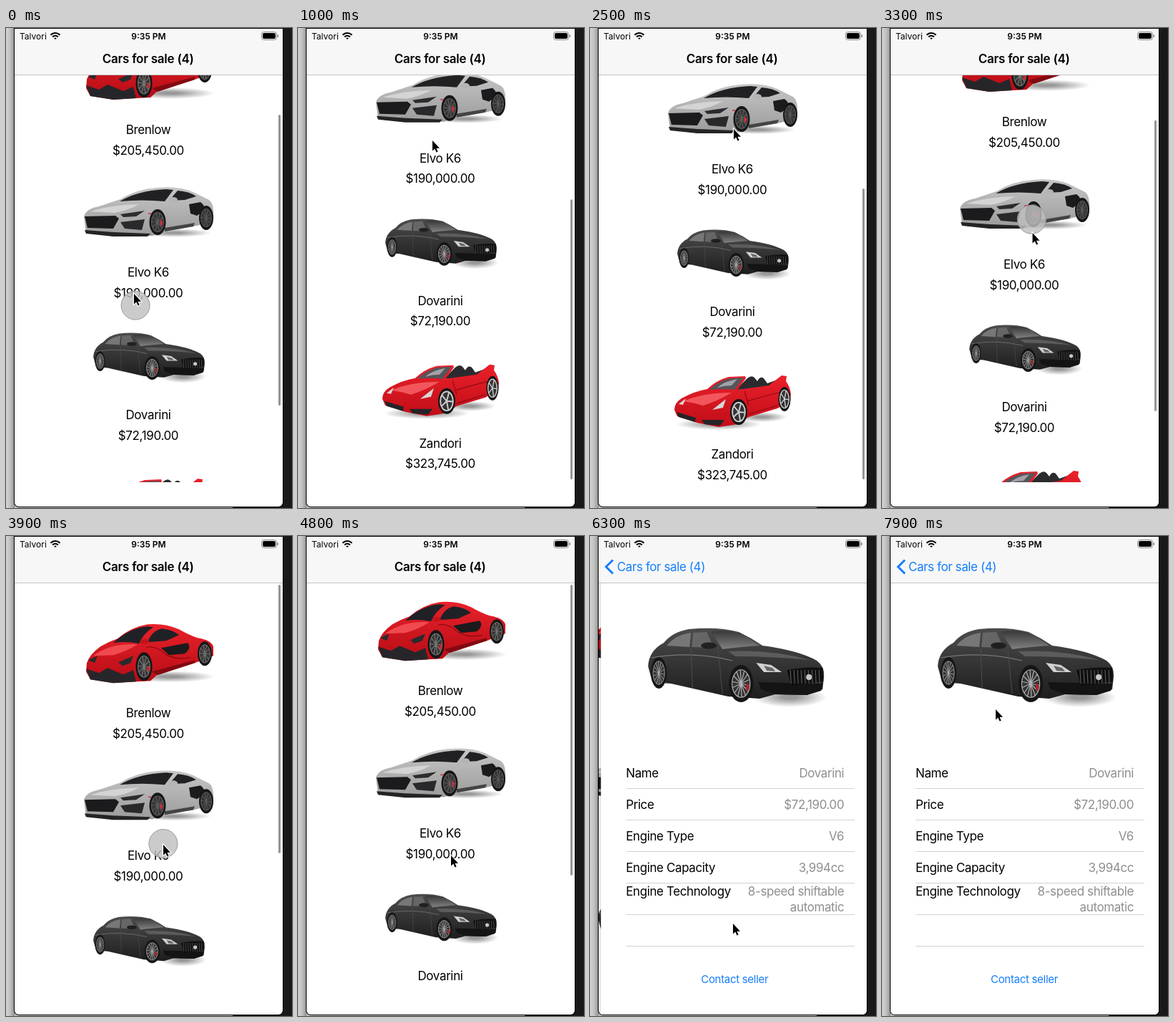
Write an HTML page with a canvas that moves like this. It is 400 px wide and 670 px high and loops after 8 s.

```html
<!DOCTYPE html>
<html lang="en">
<head>
<meta charset="utf-8">
<title>Cars for sale</title>
<style>
html, body { margin: 0; width: 100%; height: 100%; overflow: hidden; background: #fff; }
canvas { display: block; width: 400px; height: 670px; }
</style>
</head>
<body>
<canvas id="stage"></canvas>
<script>
const W = 400, H = 670, LOOP = 8000, STEP = 100;
const MAX_SCROLL = 218, VIEW = 602, ROW = 199;
const BLUE = '#157efb', GRAY = '#8f8f8f', DARK = '#1b1b1d';

const canvas = document.getElementById('stage');
const ratio = window.devicePixelRatio || 1;
canvas.width = W * ratio;
canvas.height = H * ratio;
const ctx = canvas.getContext('2d');

// ---------- helpers ----------
const clamp = (v, a, b) => Math.min(b, Math.max(a, v));
const mix = (a, b, k) => a + (b - a) * k;
const smooth = k => k * k * (3 - 2 * k);
// Remaining distance of a critically damped spring
const spring = (ms, w) => ms <= 0 ? 1 : (1 + w * ms / 1000) * Math.exp(-w * ms / 1000);

function fill(color, d) {
  ctx.fillStyle = color;
  ctx.fill(new Path2D(d));
}

function line(color, width, d) {
  ctx.strokeStyle = color;
  ctx.lineWidth = width;
  ctx.stroke(new Path2D(d));
}

function oval(color, x, y, rx, ry) {
  ctx.fillStyle = color;
  ctx.beginPath();
  ctx.ellipse(x, y, rx, ry, 0, 0, 7);
  ctx.fill();
}

function box(color, x, y, w, h, r = 0) {
  ctx.fillStyle = color;
  ctx.beginPath();
  ctx.roundRect(x, y, w, h, r);
  ctx.fill();
}

function text(str, x, y, { size = 17, weight = 400, color = '#000', align = 'left', track = -0.4 } = {}) {
  ctx.font = `${weight} ${size}px Inter, "Open Sans", sans-serif`;
  ctx.letterSpacing = track + 'px';
  ctx.textAlign = align;
  ctx.fillStyle = color;
  ctx.fillText(str, x, y + size * 0.36);
}

function shadow(x, y, rx, ry) {
  ctx.save();
  ctx.translate(x, y);
  ctx.scale(rx, ry);
  const g = ctx.createRadialGradient(0, 0, 0.2, 0, 0, 1);
  g.addColorStop(0, 'rgba(0,0,0,.4)');
  g.addColorStop(1, 'rgba(0,0,0,0)');
  oval(g, 0, 0, 1, 1);
  ctx.restore();
}

function wheel(x, y, rx, ry, rim, spokes, weight = 0.1) {
  oval('#161616', x, y, rx, ry);
  oval('#333', x, y, rx * 0.76, ry * 0.76);
  ctx.strokeStyle = rim;
  ctx.lineWidth = rx * weight;
  ctx.beginPath();
  ctx.ellipse(x, y, rx * 0.74, ry * 0.74, 0, 0, 7);
  for (let i = 0; i < spokes; i++) {
    const a = i * 2 * Math.PI / spokes - 1.2;
    ctx.moveTo(x, y);
    ctx.lineTo(x + Math.cos(a) * rx * 0.72, y + Math.sin(a) * ry * 0.72);
  }
  ctx.stroke();
}

function tone(top, bottom, y0, y1) {
  const g = ctx.createLinearGradient(0, y0, 0, y1);
  g.addColorStop(0, top);
  g.addColorStop(1, bottom);
  return g;
}

// ---------- cars ----------
function redCoupe() {
  shadow(230, 73, 62, 8);
  fill(tone('#e8222b', '#b80c15', 0, 80), 'M112 66L113 54Q117 42 132 31Q144 24 156 20Q174 4 198 0Q222-2 242 7Q256 15 268 19Q287 22 290 31L290 44L264 54L212 70L202 79L182 80L150 82L118 77Z');
  fill('#f04a50', 'M122 44Q146 26 184 28Q168 38 150 43Z');
  fill('#202126', 'M150 26Q172 5 198 3L206 4Q192 13 186 27Q168 23 150 26Z');
  fill('#202126', 'M198 25Q204 9 218 6Q234 8 242 15L224 23Z');
  oval('#c5121b', 194, 24, 6, 3.5);
  fill(DARK, 'M217 33L254 26Q260 33 250 41L228 43Z');
  line('#8f0a12', 1.2, 'M196 32Q206 30 216 36Q232 52 258 46');
  fill('#820910', 'M204 66L264 50L264 54L212 71Z');
  fill('#26262a', 'M112 62L130 68L142 61L164 70L178 64L182 80L150 82L118 77Z');
  fill('#2a2a2e', 'M115 50L128 44L124 54ZM157 53L178 44L174 54L163 58Z');
  wheel(193, 59, 11.5, 20, '#777', 10);
  wheel(278, 41, 10, 17, '#777', 10);
  oval('#d22', 199, 62, 1.6, 4);
}

function silverCoupe() {
  shadow(235, 69, 52, 6);
  fill(tone('#c6c6c6', '#9c9c9c', 5, 72), 'M109 46Q112 35 130 32L160 22Q182 8 210 6Q242 3 262 12L284 23Q291 28 290 46L288 54L262 60L222 67L204 73L150 73L112 68Z');
  fill('#d4d4d4', 'M118 39Q145 30 186 29Q170 38 152 41Z');
  fill('#212124', 'M159 25Q184 10 224 8L234 9L222 25Q190 22 159 25Z');
  fill('#212124', 'M228 24L240 10Q256 11 266 18L250 23Z');
  oval('#b4b4b4', 234, 23, 6, 4);
  fill(DARK, 'M256 29L272 26Q279 31 277 38L267 45L258 42Z');
  fill(DARK, 'M110 46L153 45L158 49L150 63L114 62Z');
  fill('#2c2c2f', 'M160 43L194 38L182 46L164 47Z');
  fill('#29292c', 'M160 54L194 50L190 65L166 63Z');
  fill('#242426', 'M110 65L150 68L202 70L198 74L150 74L112 70Z');
  fill('#444', 'M222 62L264 55L262 60L222 67Z');
  oval('#d8404a', 201, 42, 2.5, 1);
  wheel(212, 54, 11.5, 18, '#5c5c5c', 10);
  wheel(280, 48, 10, 17, '#5c5c5c', 10);
  oval('#d03040', 217, 55, 1.6, 4);
}

// Drawn at the size of the detail page
function blackSedan() {
  shadow(276, 225, 52, 14);
  fill(tone('#4b4b4b', '#1e1e1e', 130, 226), 'M78 182Q79 160 100 149Q112 134 135 130Q175 126 205 134Q222 142 238 153Q290 160 314 174Q325 182 324 196L322 214L300 222L256 221L234 227L190 224L110 206L84 204Z');
  fill('#777', 'M104 153Q116 138 138 135L136 155Z');
  fill('#666', 'M141 135L160 134L170 156L139 155Z');
  fill(tone('#343434', '#818181', 131, 158), 'M166 133Q196 131 210 137L234 153Q205 155 182 158Z');
  fill('#5c5c5c', 'M190 161Q250 158 304 173Q250 168 200 168Z');
  line('#777', 1.2, 'M82 170Q140 160 196 174');
  line('#4c4c4c', 1, 'M138 157L140 212M176 160L182 220');
  oval('#202020', 163, 153, 11, 4.5);
  fill('#141414', 'M232 204L322 206L320 216L300 222L256 221L236 214Z');
  fill('#d2d2d2', 'M229 177L250 180L265 190L240 190Z');
  fill('#666', 'M240 181L252 184L256 189L244 188Z');
  fill('#101010', 'M272 187Q300 182 322 184L323 203L278 209Z');
  for (let x = 277; x < 321; x += 5) line('#6b6b6b', 0.9, `M${x} 187L${x + 1} 206`);
  oval('#c8c8c8', 303, 197, 4, 4);
  wheel(208, 206, 17, 26, '#b0b0b0', 14, 0.07);
  wheel(93, 191, 11, 22, '#b0b0b0', 14, 0.07);
  oval('#b02028', 217, 211, 2.2, 5);
}

function smallSedan() {
  ctx.translate(200, 44);
  ctx.scale(0.633, 0.633);
  ctx.translate(-201, -183);
  blackSedan();
}

function redSpider() {
  shadow(180, 82, 60, 8);
  shadow(240, 72, 36, 7);
  fill('#2b2b2f', 'M204 34L220 18Q226 13 230 17L234 22Q238 14 243 18L248 25L262 20L262 32Z');
  fill(tone('#e9202a', '#c00d17', 16, 86), 'M118 62Q118 52 128 46Q146 36 164 33Q176 21 194 16L217 15L218 18L206 34L250 28L268 14L275 15L274 22Q280 30 281 40L280 50L262 60L222 72L206 82L180 86L150 80L122 71Z');
  fill('#55555b', 'M167 34Q179 22 196 18L215 17L202 34Q184 32 167 34Z');
  fill('#a2a2a6', 'M178 31Q188 22 206 19L198 28Q188 28 178 31Z');
  fill('#f2565c', 'M130 50Q158 38 198 38Q178 50 158 56Q146 52 130 50Z');
  line('#8d0a12', 1.2, 'M220 50Q246 42 268 37M222 68L262 56M216 36L222 56');
  fill('#d8d8d8', 'M171 62L190 47L186 59ZM124 54L134 46L130 55Z');
  fill('#242428', 'M121 65L148 73L147 79L124 72ZM156 76L188 76L182 84L160 82Z');
  wheel(208, 65, 12, 18, '#cfcfcf', 5, 0.16);
  wheel(272, 47, 8.5, 17, '#cfcfcf', 5, 0.16);
}

const cars = [
  { name: 'Brenlow', price: '$205,450.00', draw: redCoupe },
  { name: 'Elvo K6', price: '$190,000.00', draw: silverCoupe },
  { name: 'Dovarini', price: '$72,190.00', draw: smallSedan },
  { name: 'Zandori', price: '$323,745.00', draw: redSpider }
];

const specs = [
  ['Name', cars[2].name],
  ['Price', cars[2].price],
  ['Engine Type', 'V6'],
  ['Engine Capacity', '3,994cc']
];

// ---------- motion ----------
const path = [
  [-100, 183, 402], [0, 179, 371], [700, 188, 157], [1800, 188, 157],
  [2500, 201, 141], [2700, 201, 141], [3900, 220, 431], [4300, 220, 431],
  [4800, 214, 446], [5500, 200, 541], [6900, 200, 541], [7800, 159, 242]
];

function pointer(t) {
  const i = path.findIndex(p => p[0] > t);
  if (i < 0) return path[path.length - 1].slice(1);
  const a = path[i - 1], b = path[i];
  const k = (t - a[0]) / (b[0] - a[0]);
  const e = i < 3 ? k : smooth(k);
  return [mix(a[1], b[1], e), mix(a[2], b[2], e)];
}

const pressed = t => t < 850 || (t >= 2800 && t < 4300) || (t >= 5600 && t < 5800);

function rubber(s) {
  const edge = clamp(s, 0, MAX_SCROLL), over = Math.abs(s - edge);
  return edge + Math.sign(s - edge) * VIEW * (1 - 1 / (over * 0.55 / VIEW + 1));
}

function scrollAt(t) {
  const y = pointer(t)[1];
  if (t < 850) return rubber(74 + 371 - y);
  if (t < 2700) return MAX_SCROLL + (rubber(288) - MAX_SCROLL) * spring(t - 850, 13);
  if (t < 4300) return rubber(MAX_SCROLL - Math.max(0, y - 153));
  return rubber(-60) * spring(t - 4250, 13);
}

// ---------- screens ----------
function desktop() {
  const g = ctx.createLinearGradient(0, 0, 12, 0);
  g.addColorStop(0, '#d3d3d1');
  g.addColorStop(0.5, '#c0c0be');
  g.addColorStop(1, '#8f8f8d');
  box(g, 0, 0, 12, H);
  box('#bcbcba', 12, 660, 305, 10);
  box('#191919', 317, 0, 83, H);
  box('#000', 11, -10, 377, 679, 7);
}

function list(t) {
  const s = scrollAt(t);
  const label = { align: 'center', track: -0.35 };
  ctx.save();
  ctx.beginPath();
  ctx.rect(-200, 66, 700, 568);
  ctx.clip();
  cars.forEach((car, i) => {
    const y = 216 + i * ROW - s;
    if (y < -20 || y > 780) return;
    ctx.save();
    ctx.translate(0, y - 124);
    car.draw();
    ctx.restore();
    text(car.name, 199, y, label);
    text(car.price, 199, y + 28.5, label);
  });
  ctx.restore();

  const over = Math.max(0, -s, s - MAX_SCROLL);
  const top = 68 + 0.716 * clamp(s, 0, MAX_SCROLL) + Math.max(0, s - MAX_SCROLL);
  ctx.globalAlpha = clamp((5600 - t) / 400, 0, 1);
  box('#969696', 381, top, 3, 406 - over, 1.5);
  ctx.globalAlpha = 1;
}

function detail() {
  box('#fff', 12, 66, 380, 604);
  blackSedan();
  const value = { align: 'right', color: GRAY };
  specs.forEach(([label, val], i) => {
    text(label, 47, 331 + i * 44);
    text(val, 352, 331 + i * 44, value);
  });
  text('Engine Technology', 47, 496);
  text('8-speed shiftable', 352, 496, value);
  text('automatic', 352, 518, value);
  for (let i = 0; i < 6; i++) box('#d2d2d4', 47, 352 + i * 44, 320, 1);
  text('Contact seller', 199, 619, { size: 15, align: 'center', color: BLUE, track: -0.3 });
}

function statusBar() {
  text('Talvori', 19, 11.5, { size: 12, track: 0 });
  text('9:35 PM', 199.5, 11.5, { size: 12, weight: 600, align: 'center', track: 0 });
  ctx.strokeStyle = '#000';
  ctx.lineWidth = 2.1;
  for (const r of [1.5, 5.2, 9]) {
    ctx.beginPath();
    ctx.arc(69, 16, r, -Math.PI * 0.76, -Math.PI * 0.24);
    ctx.stroke();
  }
  ctx.strokeStyle = '#8a8a8a';
  ctx.lineWidth = 1;
  ctx.beginPath();
  ctx.roundRect(357.5, 5.5, 21, 11, 3);
  ctx.stroke();
  box('#000', 359, 7, 18, 8, 2);
  box('#8a8a8a', 379.5, 9, 1.5, 4, 1);
}

function navBar(p) {
  box('#f7f7f7', 12, 1, 375, 64);
  box('#c3c3c5', 12, 65, 375, 1);
  statusBar();
  const title = 'Cars for sale (4)', x = mix(198.7, 98.5, p);
  ctx.globalAlpha = 1 - p;
  text(title, x, 43, { weight: 600, align: 'center', track: -0.25 });
  ctx.globalAlpha = p;
  text(title, x, 43, { color: BLUE, align: 'center' });
  line(BLUE, 3, 'M32 33.5L22.5 43L32 52.5');
  ctx.globalAlpha = 1;
}

function cursor(t) {
  const [x, y] = pointer(t);
  if (pressed(t)) {
    const [cx, cy] = pointer(t - 52);
    oval('rgba(192,192,192,.82)', cx, cy, 20, 20);
    ctx.strokeStyle = '#9a9a9a';
    ctx.lineWidth = 1;
    ctx.stroke();
  }
  const arrow = 'M0 0V14.5L3.3 11.5L5.5 16.6L7.6 15.7L5.5 10.7H10Z';
  ctx.save();
  ctx.translate(x, y);
  line('#fff', 2.2, arrow);
  fill('#000', arrow);
  ctx.restore();
}

function draw(t) {
  const p = 1 - spring(t - 5900, 17);
  ctx.setTransform(ratio, 0, 0, ratio, 0, 0);
  desktop();
  ctx.save();
  ctx.beginPath();
  ctx.roundRect(12, 1, 375, 667, [0, 0, 6, 6]);
  ctx.clip();
  box('#fff', 12, 1, 375, 667);
  if (p < 0.9999) {
    ctx.save();
    ctx.translate(-112 * p, 0);
    list(t);
    ctx.restore();
    box(`rgba(0,0,0,${0.1 * p})`, 12, 66, 375, 604);
  }
  if (p > 0) {
    ctx.save();
    ctx.translate(375 * (1 - p), 0);
    detail();
    ctx.restore();
  }
  navBar(p);
  cursor(t);
  ctx.restore();
}

const start = performance.now();
function tick() {
  const t = (performance.now() - start) % LOOP;
  draw(Math.floor(t / STEP) * STEP);
  requestAnimationFrame(tick);
}
tick();
</script>
</body>
</html>
```
